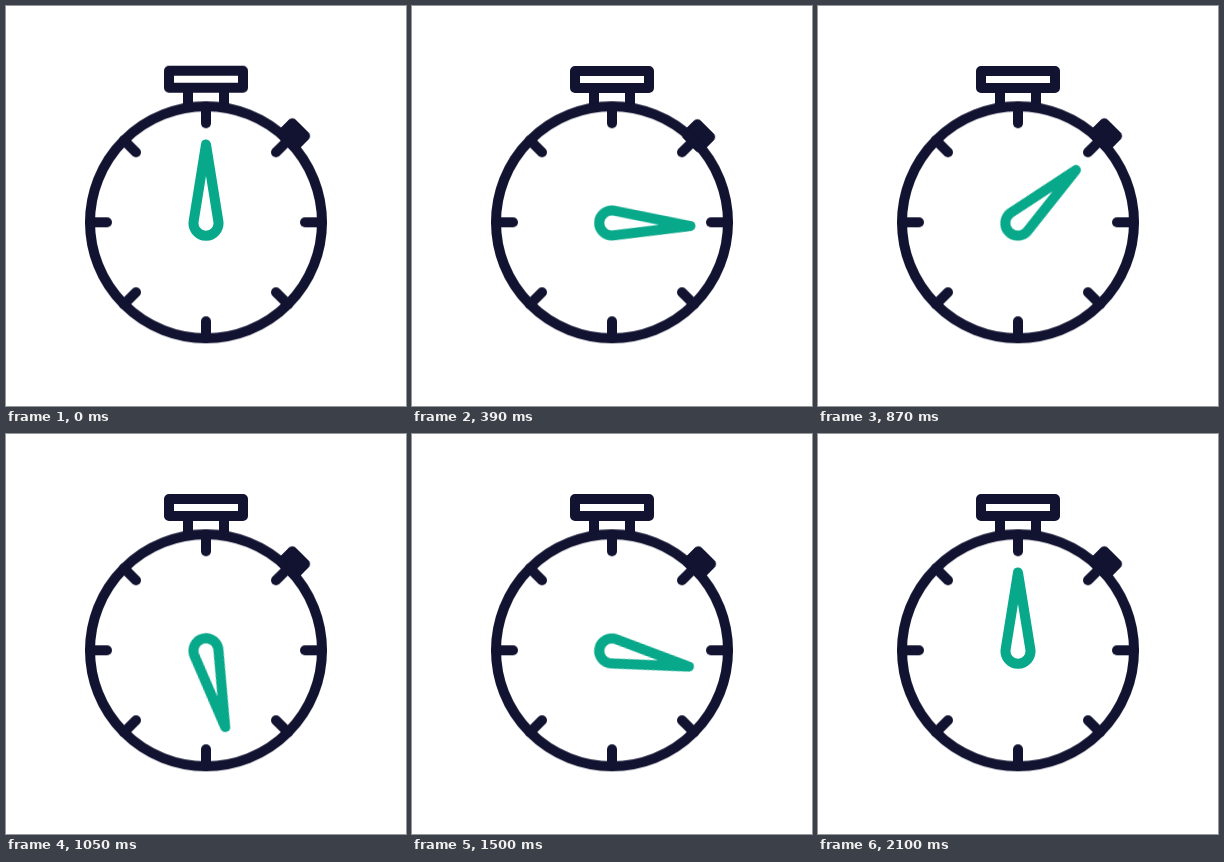
Write an HTML page that moves like this. It is 400 by 400 pixels and loops after 2.16 s.

```html
<!DOCTYPE html>
<html lang="en">
<head>
<meta charset="utf-8">
<title>Stopwatch</title>
<style>
  html, body { margin: 0; width: 100%; height: 100%; overflow: hidden; background: #fff; }
  svg { display: block; width: 100vw; height: 100vh; }

  .line { fill: none; stroke: #121331; stroke-width: 10; stroke-linecap: round; stroke-linejoin: round; }
  .hand { fill: none; stroke: #08a88a; stroke-width: 10; stroke-linejoin: round; }
  .button { fill: #121331; }

  .watch, .crown, .button, .hand { animation: 2160ms -2ms infinite; }
  .watch { animation-name: nudge; }
  .crown { animation-name: push; }
  .button { animation-name: press; }
  .hand { animation-name: spin; }

  /* Three turns at a constant rate, one step every 30 ms */
  @keyframes spin {
    0% { transform: rotate(0deg); animation-timing-function: step-end; }
    12.5% { transform: rotate(13.4deg); animation-timing-function: steps(54); }
    87.5% { transform: rotate(1077.7deg); animation-timing-function: step-end; }
    88.889%, 100% { transform: rotate(1080deg); }
  }

  @keyframes nudge {
    0%, 5% { transform: translate(0, 0); animation-timing-function: ease-in-out; }
    10.5% { transform: translate(-1.6px, 6.2px); animation-timing-function: ease-in-out; }
    17.5%, 75.5% { transform: translate(0, 0); animation-timing-function: ease-in-out; }
    82% { transform: translate(-1px, 2.4px); animation-timing-function: ease-in-out; }
    94%, 100% { transform: translate(0, 0); }
  }

  @keyframes push {
    0% { transform: translateY(0); animation-timing-function: ease-out; }
    4.5% { transform: translateY(-5px); animation-timing-function: ease-in-out; }
    10% { transform: translateY(6px); animation-timing-function: ease-in-out; }
    17.5%, 100% { transform: translateY(0); }
  }

  /* The button sits in a rotated frame, so +y points to the centre */
  @keyframes press {
    0%, 14% { transform: translateY(0); animation-timing-function: ease-in-out; }
    18% { transform: translateY(1.3px); animation-timing-function: ease-in-out; }
    23%, 72.5% { transform: translateY(0); animation-timing-function: ease-in-out; }
    81.5% { transform: translateY(5px); animation-timing-function: ease-in-out; }
    92%, 100% { transform: translateY(0); }
  }
</style>
</head>
<body>
<svg viewBox="0 0 400 400">
  <defs><path id="tick" d="M0-116V-99"/></defs>
  <g class="watch">
    <g class="crown line">
      <rect x="163" y="65" width="74" height="17"/>
      <path d="M182 82V100M218 82V100"/>
    </g>
    <g transform="translate(200 216.3)">
      <g transform="rotate(45)">
        <rect class="button" x="-14" y="-136" width="28" height="25" rx="5"/>
      </g>
      <g class="line">
        <circle r="116"/>
        <use href="#tick"/>
        <use href="#tick" transform="rotate(45)"/>
        <use href="#tick" transform="rotate(90)"/>
        <use href="#tick" transform="rotate(135)"/>
        <use href="#tick" transform="rotate(180)"/>
        <use href="#tick" transform="rotate(225)"/>
        <use href="#tick" transform="rotate(270)"/>
        <use href="#tick" transform="rotate(315)"/>
      </g>
    </g>
    <g transform="translate(200 217)">
      <path class="hand" d="M0-78.5L-12.3-2A12.5 12.5 0 1 0 12.3-2Z"/>
    </g>
  </g>
</svg>
</body>
</html>
```
